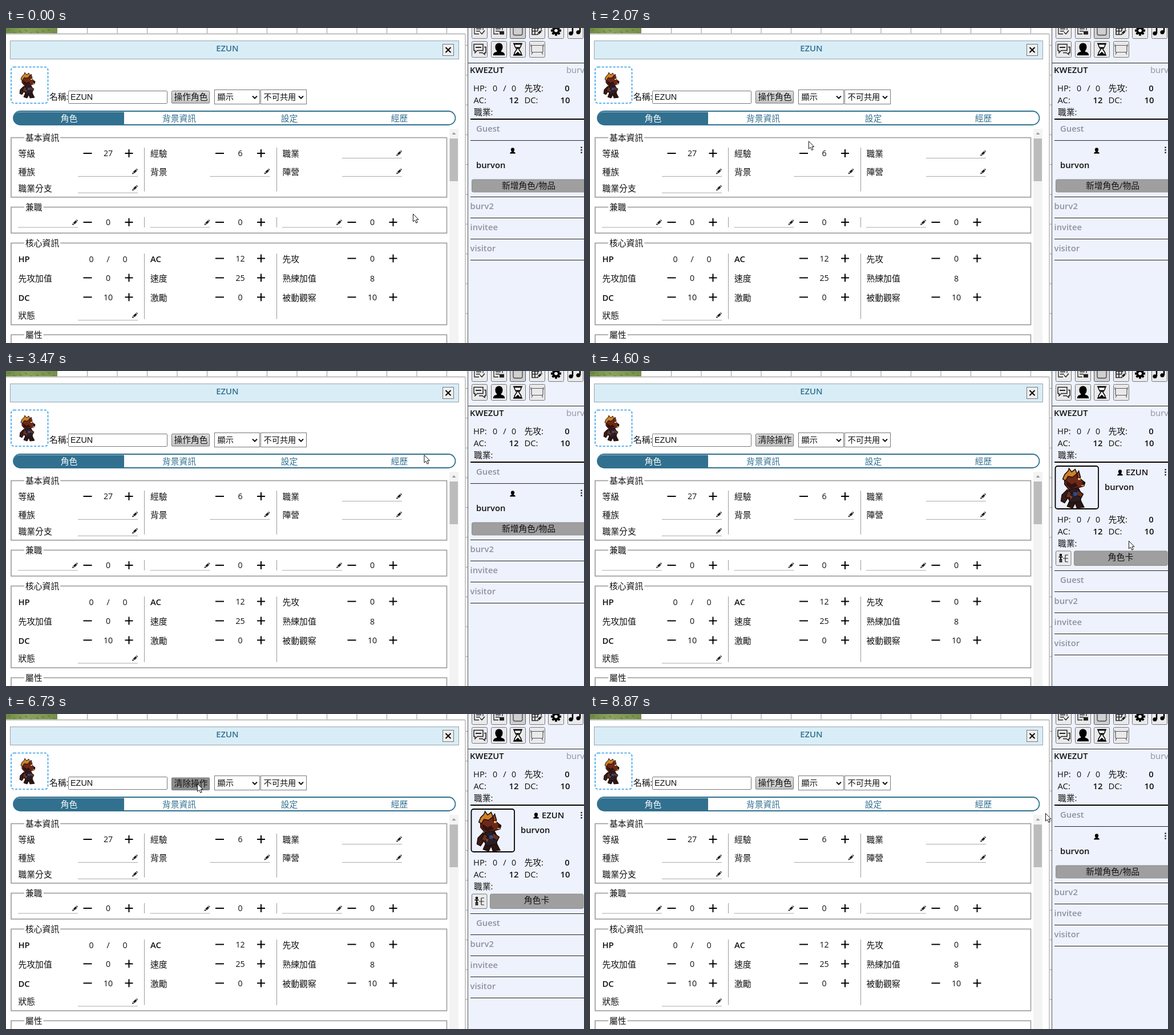
These frames come from a looping animation (1013 px wide and 553 px high, 8940 ms). An HTML page:

```html
<!DOCTYPE html>
<html lang="zh-Hant">
<head>
<meta charset="utf-8">
<title>角色卡</title>
<style>
html, body { margin: 0; width: 100%; height: 100%; overflow: hidden; background: #fff; }
svg { display: block; width: 1013px; height: 553px; }
text { font: 500 14.8px 'Open Sans', 'Noto Sans CJK TC', 'Noto Sans CJK JP', 'Noto Sans CJK SC', 'Noto Sans CJK', sans-serif; white-space: pre; }
.num { font-weight: 400; font-size: 14.2px; }
.light { font-weight: 400; }
.select { font-weight: 400; font-size: 14.2px; }
.strong, .title { font-weight: 600; }
.input { font: 14.4px 'Liberation Sans', Arial, sans-serif; }
</style>
</head>
<body>
<svg id="stage" viewBox="0 0 1013 553"></svg>
<script>
const LOOP = 8940;
const HERO = 'EZUN', OTHER = 'KWEZUT', PLAYER = 'burvon', PLAYER2 = 'burv2';
const BLUE = '#31708f', GREY = '#8d929f', INK = '#111';

const rect = (x, y, w, h, fill, stroke = 'none', rx = 0, extra = '') =>
  `<rect x="${x}" y="${y}" width="${w}" height="${h}" rx="${rx}" fill="${fill}" stroke="${stroke}" ${extra}/>`;
const text = (x, y, s, cls = '', fill = INK, anchor = 'start') =>
  `<text x="${x}" y="${y}" class="${cls}" fill="${fill}" text-anchor="${anchor}">${s}</text>`;
const mid = (x, y, s, cls = '', fill = INK) => text(x, y, s, cls, fill, 'middle');
const path = (d, stroke = INK, width = 1, fill = 'none') =>
  `<path d="${d}" stroke="${stroke}" stroke-width="${width}" fill="${fill}"/>`;
const shape = (d, fill) => path(d, 'none', 0, fill);
const hline = (x1, x2, y, stroke = INK, width = 1) => path(`M${x1} ${y}H${x2}`, stroke, width);
const vline = (x, y1, y2, stroke = '#999', width = 1) => path(`M${x} ${y1}V${y2}`, stroke, width);
const at = (x, y, body, scale = 1) => `<g transform="translate(${x} ${y}) scale(${scale})">${body}</g>`;
const range = (n, f) => Array.from({ length: n }, (_, i) => f(i)).join('');

const defs = `<defs>
<linearGradient id="grass"><stop stop-color="#6f8a45"/><stop offset=".4" stop-color="#8ba35c"/><stop offset="1" stop-color="#758f4a"/></linearGradient>
<linearGradient id="button" x2="0" y2="1"><stop stop-color="#dcdcdc"/><stop offset="1" stop-color="#c4c4c4"/></linearGradient>
</defs>`;

// A small beast in dark clothes, about 30 by 46
const limb = (d, fill) => path(d, '#1c0f0e', 1, fill);
const sprite =
  limb('M8 24L2 30L1 37L5 39L9 33Z', '#3a1b16') +
  limb('M11 36L8 43L14 45L17 39L19 45L27 44L23 36Z', '#2b1512') +
  limb('M10 22L20 21L24 29L23 37L12 39L8 32Z', '#2b1d24') +
  limb('M19 24L26 29L24 33L18 30ZM9 25L6 32L10 34L13 28Z', '#66301d') +
  limb('M5 8L13 5L21 6L23 12L28 16L27 20L20 22L10 24L5 18Z', '#6d2818') +
  shape('M7 14L13 18L17 16L20 20L12 23L7 19Z', '#32130f') +
  limb('M5 7L9 3L10 0L13 4L17 1L19 6L14 10L9 9L6 14L3 12Z', '#d08127') +
  limb('M19 6L21 3L23 10L20 12Z', '#8f3f20') +
  shape('M20 11h3v2h-3ZM24 19h3v1h-3Z', '#f2bd65') +
  shape('M25 15h3v3h-3Z', '#1d1414') +
  shape('M15 27h4v4h-4Z', '#294c8f') +
  shape('M10 30L14 32L12 35Z', '#8f4023');

const person = shape('M0 -5.2C4 -5.2 3.6 0 1.8 1.2V2C4 2.4 4.8 3 4.8 5H-4.8C-4.8 3 -4 2.4 -1.8 2V1.2C-3.6 0 -4 -5.2 0 -5.2Z', '#000');
const pencil = shape('M-5 5L-4 1.8L-1.2 4.2ZM-3.3 .9L1.2 -3.2L3.6 -.8L-.6 3.4ZM2 -4L3 -4.8L5 -2.8L4.2 -1.6Z', '#222');
const chevron = path('M-4 -2L0 2L4 -2', '#111', 2);
const dots = range(3, i => rect(-1.2, i * 4.5 - 5.5, 2.4, 2.4, '#222'));

// Character sheet
const columns = [21.5, 253, 484.5];
const stepper = (x, y, n) =>
  hline(x + 114, x + 129, y - .5, '#000', 2) + mid(x + 157.5, y + 4.5, n, 'num') +
  hline(x + 187, x + 201, y - .5, '#000', 2) + vline(x + 194, y - 7.5, y + 6.5, '#000', 2);
const blank = (x, y) => hline(x, x + 105, y + 8.5, '#aaa') + at(x + 100, y - .5, pencil);
const label = (x, y, s) => text(x, y, s, /^[A-Z]/.test(s) ? 'strong' : '');
const field = (col, y, name, n) => {
  const x = columns[col];
  return label(x, y + 5.5, name) + (n === undefined ? blank(x + 104.5, y) : stepper(x, y, n));
};
const fieldset = (y, h, name) => rect(9, y, 763.5, h, 'none', '#a0a0a0', 0, 'stroke-width="1.7"') +
  rect(32, y - 3, name.length * 14.8 + 4, 6, '#fff') + text(34, y + 5.5, name, 'light');
const dividers = (y1, y2) => vline(242.5, y1, y2) + vline(474.5, y1, y2);

const backdrop =
  rect(0, 0, 1013, 553, '#fff') + rect(0, 0, 90, 10, 'url(#grass)') +
  range(9, i => path(`M${3 + i * 10} ${2 + i * 5 % 7}l4 3`, '#5f7c3c', 1.5)) +
  range(13, i => vline(142.5 + i * 52.5, 0, 10, '#999')) +
  range(10, i => hline(805, 809, 30.5 + i * 52.3, '#999'));

const sheet =
  rect(-2, 10, 807, 560, '#fff', '#bbb', 2, 'stroke-width="1.5"') +
  hline(0, 804, 11.5, '#e2e2e2') +
  rect(7.5, 22.5, 786, 32, '#d9edf7', '#98a4aa') + mid(388, 41, HERO, 'title', BLUE) +
  rect(765.5, 28.5, 19, 20, '#efefef', '#777') + path('M770.5 34L779.5 43M779.5 34L770.5 43', '#111', 2.2) +
  rect(9, 68.5, 64.5, 63.5, '#fff', '#2f9be8', 5, 'stroke-width="1.6" stroke-dasharray="4.2 2.4"') +
  at(23, 78, sprite) + text(76, 126, '名稱:', 'light') +
  rect(109.5, 110.5, 173, 22, '#fff', '#767676', 1, 'id="name"') + text(113, 126, HERO, 'input') +
  rect(155, 113, 1.2, 17, '#000', 'none', 0, 'id="caret"') +
  '<g id="control">' + rect(290.5, 110.5, 66, 21.5, 'url(#button)', '#767676', 1, 'id="controlFace"') +
  `<text id="controlText" x="324" y="125.7" text-anchor="middle" fill="#111"></text></g>` +
  rect(365.5, 108.5, 79, 25, '#fff', '#767676') + text(370.5, 125.5, '顯示', 'select') + at(436, 121.5, chevron) +
  rect(446.5, 108.5, 80, 25, '#fff', '#767676') + text(451.5, 125.5, '不可共用', 'select') + at(517, 121.5, chevron) +
  rect(13, 146, 774.5, 24, '#fff', BLUE, 12, 'stroke-width="1.8"') +
  shape('M207 147.5H24.5A11 11 0 0 0 24.5 170H207Z', BLUE) +
  ['角色', '背景資訊', '設定', '經歷'].map((s, i) => mid(110.5 + i * 193, 163.8, s, '', i ? BLUE : '#fff')).join('') +
  rect(777, 177, 16, 376, '#f3f3f3') + shape('M781.5 187L785 183L788.5 187Z', '#999') +
  rect(777.5, 194, 14.5, 75, '#bcbcbc') +
  fieldset(192.5, 104.5, '基本資訊') + dividers(210, 287) +
  field(0, 220.5, '等級', 27) + field(1, 220.5, '經驗', 6) + field(2, 220, '職業') +
  field(0, 252, '種族') + field(1, 252, '背景') + field(2, 252, '陣營') + field(0, 281, '職業分支') +
  fieldset(314.5, 45.5, '兼職') + dividers(332, 350) +
  columns.map(x => blank(x - .5, 341.5) + stepper(x, 341.5, 0)).join('') +
  fieldset(377.5, 143.5, '核心資訊') + dividers(396, 511) +
  label(21.5, 411, 'HP') + mid(149.5, 410.5, '0', 'num') + mid(179, 410.5, '/', 'num') + mid(208.5, 410.5, '0', 'num') +
  field(1, 405, 'AC', 12) + field(2, 405, '先攻', 0) +
  field(0, 439, '先攻加值', 0) + field(1, 439, '速度', 25) + label(484.5, 444.5, '熟練加值') + mid(642, 444.5, 8, 'num') +
  field(0, 473, 'DC', 10) + field(1, 473, '激勵', 0) + field(2, 473, '被動觀察', 10) +
  field(0, 504.5, '狀態') + fieldset(538.5, 40, '屬性');

// Sidebar
const note = path('M-9 -9H6V-1M-9 -9V6H-1M-6 -3H3M-6 1H1', '#222', 1.3);
const teeth = range(8, i => `<rect x="-2" y="-9" width="4" height="6" transform="rotate(${i * 45})"/>`);
const upperIcons = [
  note + path('M1 3L4 6L9 0', '#222', 1.5),
  note + rect(1, 1, 8, 6, '#222'),
  rect(-8, -9, 16, 17, 'none', '#444', 3, 'stroke-width="1.3"'),
  path('M-9 -9H7V-2M-9 -9V7H-1M-9 -4H4M-9 1H1M-4 -9V7M1 -9V1', '#222', 1.6) + at(4, 3, pencil),
  teeth + `<circle r="4.8" fill="none" stroke="#000" stroke-width="3.5"/>`,
  path('M-5 5V-8L8 -10V3', '#000', 2.5) + `<circle cx="-8" cy="5" r="3.6"/><circle cx="5" cy="3" r="3.6"/>`
];
const lowerIcons = [
  path('M-10 -9H6V2H-4L-8 6V2H-10ZM8 -4H11V6H9V9L5 6H-1', '#222', 1.5) + path('M-7 -3.5H3', '#222', 2),
  at(0, 0, person, 2.1),
  path('M-8 -10H8M-8 10H8', '#000', 2.2) + path('M-6 -9C-6 -3 -2 -2 -2 0S-6 3 -6 9H6C6 3 2 2 2 0S6 -3 6 -9Z', '#000', 1.6, '#fff') + shape('M-4 -4H4L0 0ZM-5 9L0 4L5 9Z', '#000'),
  rect(-10, -7, 20, 12, 'none', '#555', 1, 'stroke-width="1.2"') + path('M-11 -9V-5M11 -9V-5M-8 5L-10 9M8 5L10 9', '#555', 1.2)
];
const toolbar = (icons, y) => icons.map((icon, i) => {
  const on = y < 20 && i === 2, x = Math.round(816 + i * 33.6);
  return rect(x + .5, y - 14, 27, 28, on ? '#cfcfd1' : '#eaeaec', on ? '#555' : '#777', 2) + at(x + 14, y, icon);
}).join('');
const stats = y =>
  text(819, y, 'HP:') + mid(857, y, '0', 'num') + mid(874, y, '/') + mid(890, y, '0', 'num') +
  text(908.5, y, '先攻:') + mid(983.5, y, '0', 'strong') +
  text(819.5, y + 21, 'AC:') + mid(890, y + 21, '12', 'strong') +
  text(908.5, y + 21, 'DC:') + mid(980, y + 21, '10', 'strong') + text(820, y + 42, '職業:');
const wideButton = (x, y, w, h, cx, s) => rect(x, y, w, h, '#9f9f9f', '#8c8c8c', 2.5) + mid(cx, y + 16, s);
const members = y => [PLAYER2, 'invitee', 'visitor'].map((s, i) =>
  text(813.5, y + 21.5 + i * 37, s, 'strong', GREY) + hline(814, 1013, y + 37 + i * 37, '#222', 1.2)).join('');
const outlines = (id, y) => `<g id="${id}">` + vline(810.5, 62, 553, '#79b9ad', 1.6) +
  range(3, i => rect(814.5, y + 1 + i * 37, 199, 36, 'none', '#8cc6bb', 0, 'stroke-width="1.5"')) + '</g>';
const tree = '<circle cx="825" cy="323" r="2.3"/>' + path('M821.5 326.5H828.5M825 326V331M823.7 330V336M826.3 330V336', '#111', 2) +
  path('M829 329H838M833 323H838M833 335H838M833 323V335', '#222', 1.2);

const sidebar =
  rect(810, 0, 203, 553, '#eef2fc') + vline(809.5, 0, 553, '#666', 1.2) +
  toolbar(upperIcons, 4.5) + toolbar(lowerIcons, 37.5) + hline(810, 1013, 61.5, '#222') +
  text(813, 79, OTHER, 'strong') + text(982, 79, PLAYER, '', GREY) + stats(111) +
  hline(814, 1013, 160, '#000', 1.8) +
  `<g id="free">` + text(824, 182, 'Guest', 'strong', GREY) + hline(814, 1013, 197.5, '#222', 1.2) +
  at(888, 215.5, person) + at(1008.5, 214, dots) + text(824, 246, PLAYER, 'strong') +
  wideButton(816.5, 266, 200, 22, 916, '新增角色/物品') + hline(814, 1013, 296.5, '#222', 1.2) +
  members(296.5) + outlines('freeFlash', 296.5) + '</g>' +
  `<g id="held">` + rect(815.5, 167, 75.5, 75, 'none', '#000', 4, 'stroke-width="1.8"') + at(824, 171, sprite, 1.55) +
  at(929, 178.5, person) + text(939, 183, HERO, 'strong') + at(1008.5, 177.5, dots) + text(902, 208.5, PLAYER, 'strong') +
  stats(266) + rect(816.5, 316, 26.5, 25.5, '#eaeaec', '#777', 2) + tree +
  wideButton(848.5, 316, 163.5, 25.5, 930, '角色卡') + hline(814, 1013, 350.5, '#222', 1.2) +
  text(824, 372, 'Guest', 'strong', GREY) + hline(814, 1013, 387.5, '#222', 1.2) +
  members(387.5) + outlines('heldFlash', 387.5) + '</g>';

const pointer = `<g id="arrow">` + path('M.5 .5V14L3.6 11.2L5.8 16.3L8.2 15.2L6 10.3H10Z', '#111', 1, '#fff') + '</g>' +
  `<g id="beam">` + path('M-3 -8H-1L0 -7L1 -8H3M0 -7V7M-3 8H-1L0 7L1 8H3', '#111', 1.2) + '</g>';

const stage = document.getElementById('stage');
stage.innerHTML = defs + backdrop + sheet + sidebar + pointer;
const el = id => document.getElementById(id);
const show = (id, on) => el(id).setAttribute('visibility', on ? 'inherit' : 'hidden');

// Pointer stops: time, x, y
const stops = [
  [0, 713, 326], [350, 800, 255], [650, 940, 200], [800, 988, 196], [930, 960, 211], [1200, 925, 210],
  [1430, 935, 285], [1600, 800, 297], [1750, 520, 282], [1870, 420, 262], [2000, 395, 220],
  [2300, 350, 140], [2530, 335, 121], [3000, 335, 121], [3130, 423, 117], [3450, 720, 145],
  [3870, 905, 185], [4250, 955, 250], [4600, 944, 298], [4800, 714, 204], [5050, 520, 90],
  [5300, 330, 44], [5550, 195, 85], [5730, 175, 121], [5870, 165, 122], [6020, 165, 122],
  [6300, 360, 118], [6530, 335, 122], [7250, 335, 122], [7450, 640, 150], [7670, 913, 169],
  [7850, 960, 185], [8130, 780, 160], [8380, 460, 95], [8550, 520, 66], [8780, 796, 172], [8870, 798, 174], [LOOP, 798, 174]
];
const slope = (i, k) => (stops[i + 1][k] - stops[i][k]) / (stops[i + 1][0] - stops[i][0]);
function tangent(i, k) {
  if (i === 0 || i === stops.length - 1) return 0;
  const a = slope(i - 1, k), b = slope(i, k);
  return a * b > 0 ? 2 * a * b / (a + b) : 0;
}
// Monotone cubic: smooth, with no overshoot around pauses
function pointerAt(t, k) {
  const i = Math.max(0, stops.findIndex(s => s[0] > t) - 1);
  const p = stops[i], q = stops[i + 1], d = q[0] - p[0], u = (t - p[0]) / d, v = 1 - u;
  return v * v * (1 + 2 * u) * p[k] + u * v * v * d * tangent(i, k) +
    u * u * (3 - 2 * u) * q[k] - u * u * v * d * tangent(i + 1, k);
}

function draw(t) {
  const within = (a, b) => t >= a && t < b;
  const x = pointerAt(t, 1), y = pointerAt(t, 2);
  const inside = (x1, x2) => x >= x1 && x <= x2 && y >= 110 && y <= 133;
  const held = within(3500, 7500), focus = within(5730, 6730);
  const pressed = within(2670, 3000) || within(6730, 7270);

  el('controlFace').setAttribute('fill', pressed ? '#8e8e8e' : inside(290, 357) ? '#b9b9b9' : 'url(#button)');
  el('control').setAttribute('transform', `translate(0 ${pressed ? 1.5 : 0})`);
  el('controlText').textContent = held ? '清除操作' : '操作角色';
  el('name').setAttribute('stroke', focus ? '#111' : '#767676');
  el('name').setAttribute('stroke-width', focus ? 1.8 : 1);
  show('caret', within(5730, 6230));
  show('held', held);
  show('free', !held);
  for (const [id, from] of [['heldFlash', 3500], ['freeFlash', 7500]])
    el(id).setAttribute('opacity', within(from, from + 450) ? 1 : 0);

  const typing = inside(110, 283);
  show('beam', typing);
  show('arrow', !typing);
  for (const id of ['beam', 'arrow']) el(id).setAttribute('transform', `translate(${x} ${y})`);
}

const start = performance.now();
function tick() {
  draw((performance.now() - start) % LOOP);
  requestAnimationFrame(tick);
}
draw(0);
requestAnimationFrame(tick);
</script>
</body>
</html>
```
